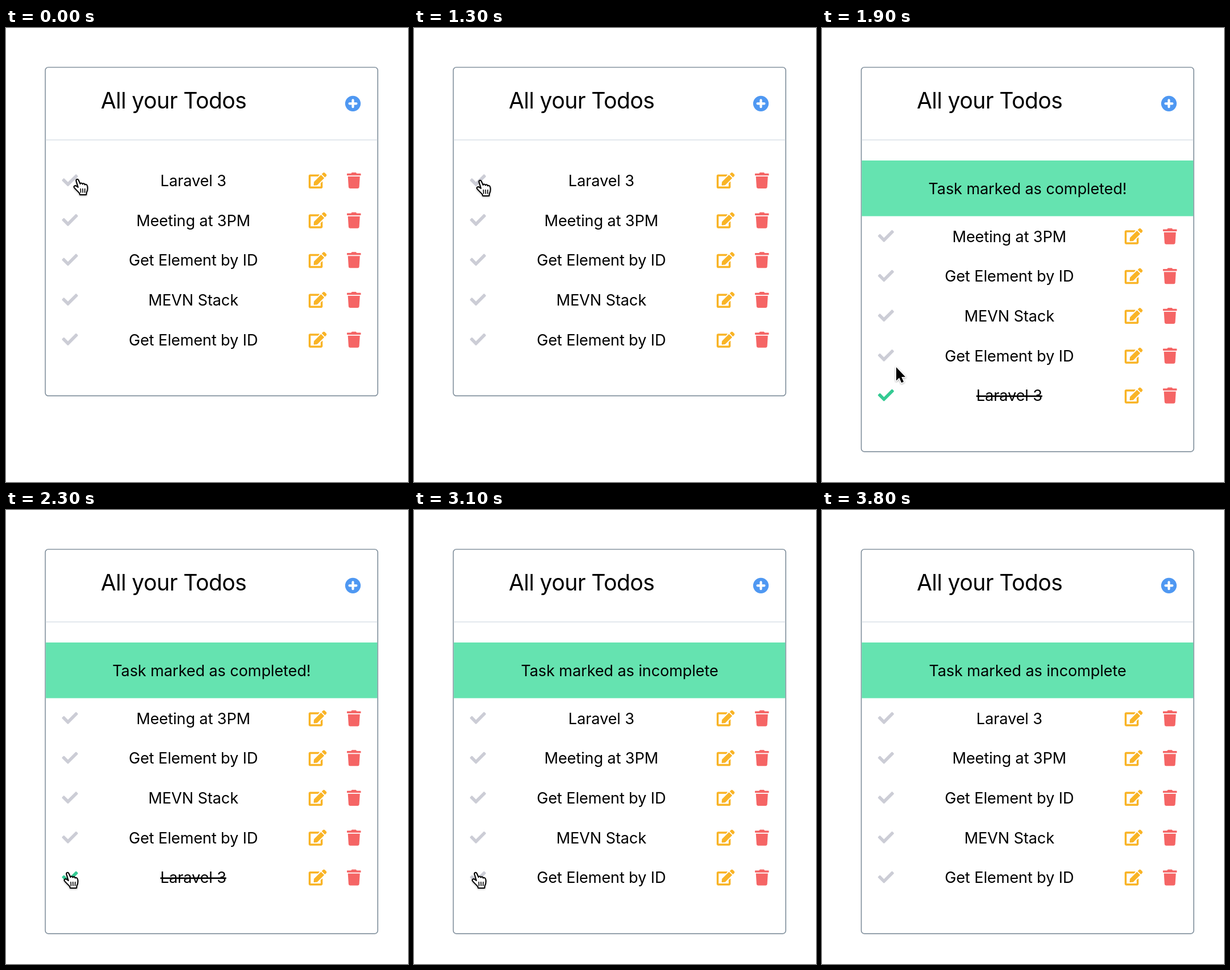
An HTML page that plays this animation: 704 by 795 pixels, repeating every 3.9 s.

```html
<!DOCTYPE html>
<html lang="en">
<head>
<meta charset="utf-8">
<title>Todos</title>
<style>
  html, body { margin: 0; width: 100%; height: 100%; overflow: hidden; background: #fff; }
  svg { display: block; }
  text { font: 27px Inter, Roboto, sans-serif; font-optical-sizing: none; letter-spacing: -.12px; text-anchor: middle; }
  .title { font-size: 39px; letter-spacing: -.6px; }
  .done text { text-decoration: line-through; }
  .check { fill: #cccdd6; }
  .done .check { fill: #34ca93; }
  .edit { fill: #f9b426; }
  .trash { fill: #f56565; }
  #pointer { filter: drop-shadow(0 1.5px 1.5px rgba(0, 0, 0, .35)); }
</style>
</head>
<body>
<svg width="704" height="795" viewBox="0 0 704 795">
  <defs>
    <path id="check" d="M173.9 439.4l-166.4-166.4c-10-10-10-26.2 0-36.2l36.2-36.2c10-10 26.2-10 36.2 0L192 312.7 432.1 72.6c10-10 26.2-10 36.2 0l36.2 36.2c10 10 10 26.2 0 36.2l-294.4 294.4c-10 10-26.2 10-36.2 0z"/>
    <path id="edit" d="M402.6 83.2l90.2 90.2c3.8 3.8 3.8 10 0 13.8L274.4 405.6l-92.8 10.3c-12.4 1.4-22.9-9.1-21.5-21.5l10.3-92.8L388.8 83.2c3.8-3.8 10-3.8 13.8 0zm162-22.9l-48.8-48.8c-15.2-15.2-39.9-15.2-55.2 0l-35.4 35.4c-3.8 3.8-3.8 10 0 13.8l90.2 90.2c3.8 3.8 10 3.8 13.8 0l35.4-35.4c15.2-15.3 15.2-40 0-55.2zM384 346.2V448H64V128h229.8c3.2 0 6.2-1.3 8.5-3.5l40-40c7.6-7.6 2.2-20.5-8.5-20.5H48C21.5 64 0 85.5 0 112v352c0 26.5 21.5 48 48 48h352c26.5 0 48-21.5 48-48V306.2c0-10.7-12.9-16-20.5-8.5l-40 40c-2.2 2.3-3.5 5.3-3.5 8.5z"/>
    <path id="trash" d="M432 32H312l-9.4-18.7A24 24 0 0 0 281.1 0H166.8a23.7 23.7 0 0 0-21.4 13.3L136 32H16A16 16 0 0 0 0 48v32a16 16 0 0 0 16 16h416a16 16 0 0 0 16-16V48a16 16 0 0 0-16-16zM53.2 467a48 48 0 0 0 47.9 45h245.8a48 48 0 0 0 47.9-45L416 128H32z"/>
    <g id="hand" stroke-linejoin="round" stroke-linecap="round">
      <path fill="#fff" stroke="#000" stroke-width="2" d="M6 5C5 2 8.5 .5 10 3.5L13 10C13.5 8 16 7.8 17 10.5C18 8.5 20.5 9 21 11.5C22.5 10 25 11 25.5 14C26.5 19 26 21 24 25L23.5 29H12.5L11.5 26C8 22 5 20 2.5 16.5C1 14 4 12 6.5 14L9.3 16Z"/>
      <path fill="none" stroke="#000" stroke-width="1.6" d="M13.5 18.5l.3 6.5M17.3 18.5l.2 6.5M21.2 18.5l-.2 6.5"/>
    </g>
    <path id="arrow" fill="#000" stroke="#fff" stroke-width="3" stroke-linejoin="round" paint-order="stroke"
      d="M1 2V25.5L6.3 20.5L10.2 29.3L14 27.6L10.2 19H17Z"/>
  </defs>

  <rect id="card" x="68.75" y="68.75" width="582.3" rx="5.5" fill="#fff" stroke="#8795a1" stroke-width="1.7"/>
  <text class="title" x="293.5" y="141">All your Todos</text>
  <circle cx="607.5" cy="132.3" r="13.6" fill="#4f98f2"/>
  <path d="M601.6 132.3h11.8M607.5 126.4v11.8" stroke="#fff" stroke-width="4.2" stroke-linecap="round"/>
  <path d="M69.6 196h580.6" stroke="#dae1e7" stroke-width="1.7"/>
  <g id="banner">
    <rect x="69.6" y="232" width="580.6" height="97.5" fill="#65e3b0"/>
    <text id="message" x="360" y="291"></text>
  </g>
  <g id="list"></g>
  <use id="pointer"/>
</svg>
<script>
const LOOP = 3900, STEP = 100, ROW = 69.67, BANNER = 97.7;
const COMPLETED_AT = 1400, REOPENED_AT = 3100;
const $ = id => document.getElementById(id);

const todos = ['Laravel 3', 'Meeting at 3PM', 'Get Element by ID', 'MEVN Stack', 'Get Element by ID'];
const reordered = [...todos.slice(1), todos[0]];

// Start time, pointer shape, left, top
const pointerPath = [
  [0, 'hand', 117, 263],
  [100, 'hand', 114, 264],
  [200, 'hand', 110, 265],
  [300, 'hand', 108, 265],
  [1400, 'arrow', 118, 263],
  [1700, 'arrow', 121, 300],
  [1800, 'arrow', 128, 455],
  [1900, 'arrow', 129, 592],
  [2000, 'arrow', 127, 612],
  [2100, 'hand', 104, 631],
  [2200, 'hand', 100, 633],
  [3200, 'hand', 100, 635],
  [3300, 'hand', 101, 637],
  [3400, null]
];

const icon = (name, x, y) =>
  `<use href="#${name}" class="${name}" transform="translate(${x} ${y}) scale(${28 / 512})"/>`;

function todoRow(label, index, done) {
  return `<g class="${done ? 'done' : ''}" transform="translate(0 ${index * ROW})">
    ${icon('check', 98, 252.7)}<text x="328" y="277">${label}</text>
    ${icon('edit', 530, 253)}${icon('trash', 597, 253)}</g>`;
}

function showList(phase) {
  const completed = phase === 1;
  const offset = phase ? BANNER : 0;
  $('card').setAttribute('height', 575.4 + offset);
  $('banner').setAttribute('visibility', phase ? 'visible' : 'hidden');
  $('message').textContent = completed ? 'Task marked as completed!' : 'Task marked as incomplete';
  $('list').setAttribute('transform', `translate(0 ${offset})`);
  $('list').innerHTML = (completed ? reordered : todos)
    .map((label, i) => todoRow(label, i, completed && i === 4)).join('');
}

function showPointer(time) {
  const [, shape, x, y] = pointerPath.findLast(([start]) => start <= time);
  $('pointer').setAttribute('visibility', shape ? 'visible' : 'hidden');
  if (!shape) return;
  $('pointer').setAttribute('href', '#' + shape);
  $('pointer').setAttribute('transform', `translate(${x} ${y})`);
}

let shownPhase = -1;
function draw() {
  const time = Math.floor(performance.now() % LOOP / STEP) * STEP;
  const phase = (time >= COMPLETED_AT) + (time >= REOPENED_AT);
  if (phase !== shownPhase) showList(shownPhase = phase);
  showPointer(time);
  requestAnimationFrame(draw);
}
draw();
</script>
</body>
</html>
```
